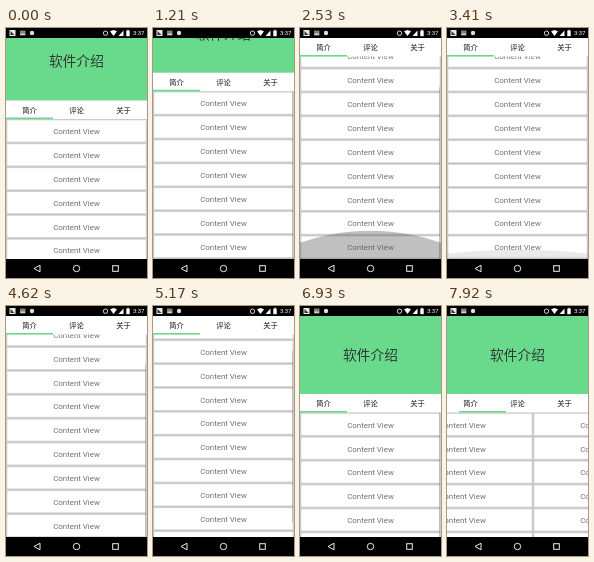
Recreate the animation shown at these times as an HTML page with a canvas. Size 141 by 250 pixels, loop 8000 ms.

```html
<!DOCTYPE html>
<html lang="zh">
<head>
<meta charset="utf-8">
<style>
  html, body { margin: 0; height: 100%; overflow: hidden; background: #000; }
  canvas { display: block; width: 100vw; height: 100vh; }
</style>
</head>
<body>
<canvas></canvas>
<script>
const W = 141, H = 250, LOOP = 8000, STEP = 110;
const BAR = 10, NAV = 231, HEADER = 78, TABS = 18.5;
const ROW = 23.87, ROWS = 10, TOP = BAR + TABS;
const GREEN = '#69da8b', FONT = 'Roboto, "Noto Sans CJK SC", "Noto Sans CJK", sans-serif';

const canvas = document.querySelector('canvas');
const ctx = canvas.getContext('2d');

// Keys are [ms, value]
const SCROLL = [[880, 15.5], [1870, 98.7], [2310, 114.2], [4510, 114.2], [4620, 113.7],
  [5170, 96.7], [5830, 85], [6380, 78], [6490, 78], [6710, 32], [6930, 0]];
const SWIPE = [[7590, 0], [7700, 15], [7810, 36], [7920, 55]];
const PULL = [[2200, 0], [2530, 1]];

function at(keys, t) {
  const i = keys.findIndex(k => k[0] > t);
  if (i === 0) return keys[0][1];
  if (i < 0) return keys[keys.length - 1][1];
  const [t0, a] = keys[i - 1], [t1, b] = keys[i];
  return a + (b - a) * (t - t0) / (t1 - t0);
}

function rect(x, y, w, h, color) {
  ctx.fillStyle = color;
  ctx.fillRect(x, y, w, h);
}

function text(str, x, y, size, color, weight = 400) {
  ctx.font = `${weight} ${size}px ${FONT}`;
  ctx.fillStyle = color;
  ctx.fillText(str, x, y + size * 0.36);
}

function poly(...points) {
  ctx.beginPath();
  for (let i = 0; i < points.length; i += 2) ctx.lineTo(points[i], points[i + 1]);
  ctx.closePath();
}

function disc(x, y, r, color) {
  ctx.beginPath();
  ctx.arc(x, y, r, 0, 7);
  ctx.fillStyle = color;
  ctx.fill();
}

function page(x, top) {
  for (let i = 0; i < ROWS; i++) {
    const y = top + i * ROW;
    rect(x + 0.7, y + 0.7, W - 1.4, ROW - 1.2, '#dadada');
    rect(x + 1.4, y + 1.4, W - 2.8, ROW - 2.8, '#fff');
    text('Content View', x + W / 2, y + 12.3, 7.9, '#707070');
  }
}

function glow(amount) {
  if (amount <= 0) return;
  const r = W * 1.5, depth = r * (1 - Math.cos(Math.PI / 6));
  ctx.save();
  ctx.translate(W / 2, NAV);
  ctx.scale(1, amount);
  disc(0, r - depth, r, `rgba(90,90,90,${0.38 * amount})`);
  ctx.restore();
}

function statusBar() {
  rect(0, 0, W, BAR, '#000');
  rect(3.5, 2, 6, 6, '#e8e8e8');
  ctx.fillStyle = '#333';
  poly(4.5, 3, 8.5, 7, 4.5, 7);
  ctx.fill();
  rect(14, 2.5, 5.5, 5, '#7d8672');
  rect(14.5, 5.5, 4.5, 1.5, '#d5d5c8');
  disc(26, 5, 2.2, '#ddd');

  ctx.strokeStyle = '#eee';
  ctx.lineWidth = 0.9;
  ctx.beginPath();
  ctx.arc(99.5, 5.2, 2.2, 0, 7);
  ctx.stroke();
  ctx.fillStyle = '#fff';
  poly(104, 3.2, 107.5, 2, 111, 3.2, 107.5, 8);
  ctx.fill();
  poly(112.5, 8, 117.5, 8, 117.5, 2.5);
  ctx.fill();
  rect(120.3, 2.5, 3.4, 5.7, '#fff');
  rect(121.2, 1.8, 1.6, 0.8, '#fff');
  text('3:37', 132.7, 5, 6, '#fff');
}

function navBar() {
  rect(0, NAV, W, H - NAV, '#000');
  ctx.strokeStyle = '#eee';
  ctx.lineWidth = 1;
  poly(28, 240.5, 34, 237.2, 34, 243.8);
  ctx.stroke();
  ctx.beginPath();
  ctx.arc(70.5, 240.5, 3.2, 0, 7);
  ctx.stroke();
  ctx.strokeRect(106.7, 237.7, 5.6, 5.6);
}

function draw(t) {
  const scroll = at(SCROLL, t);
  const folded = Math.min(scroll, HEADER), inner = scroll - folded;
  const tabTop = BAR + HEADER - folded, listTop = tabTop + TABS;
  const swipe = at(SWIPE, t);

  rect(0, 0, W, H, '#c3c3c3');
  page(-swipe, listTop - inner);
  if (swipe) page(W - swipe, listTop - inner);

  const view = NAV - TOP, ratio = view / (ROW * ROWS);
  if ((t >= 990 && t < 2750) || (t >= 4620 && t < 7370))
    rect(139, listTop + inner * ratio, 1, view * ratio, 'rgba(0,0,0,.2)');

  const fade = Math.min(1, Math.max(0, (t - 2600) / 1900));
  glow(at(PULL, t) * (1 - fade) ** 2);

  rect(0, BAR - folded, W, HEADER, GREEN);
  text('软件介绍', W / 2, BAR - folded + HEADER / 2, 13.7, '#2f3a33');
  rect(0, tabTop, W, TABS, '#fff');
  ['简介', '评论', '关于'].forEach((name, i) =>
    text(name, 23.5 + 47 * i, tabTop + 9.5, 7.3, '#111', 500));
  // The marker trails the pager by one step
  rect(at(SWIPE, t - STEP) / 3, listTop - 1.5, 47, 1.6, GREEN);

  statusBar();
  navBar();
}

function resize() {
  canvas.width = innerWidth * devicePixelRatio;
  canvas.height = innerHeight * devicePixelRatio;
}

function tick() {
  ctx.setTransform(canvas.width / W, 0, 0, canvas.height / H, 0, 0);
  ctx.textAlign = 'center';
  const t = performance.now() % LOOP;
  draw(Math.floor(t / STEP) * STEP);
  requestAnimationFrame(tick);
}

addEventListener('resize', resize);
resize();
tick();
</script>
</body>
</html>
```
